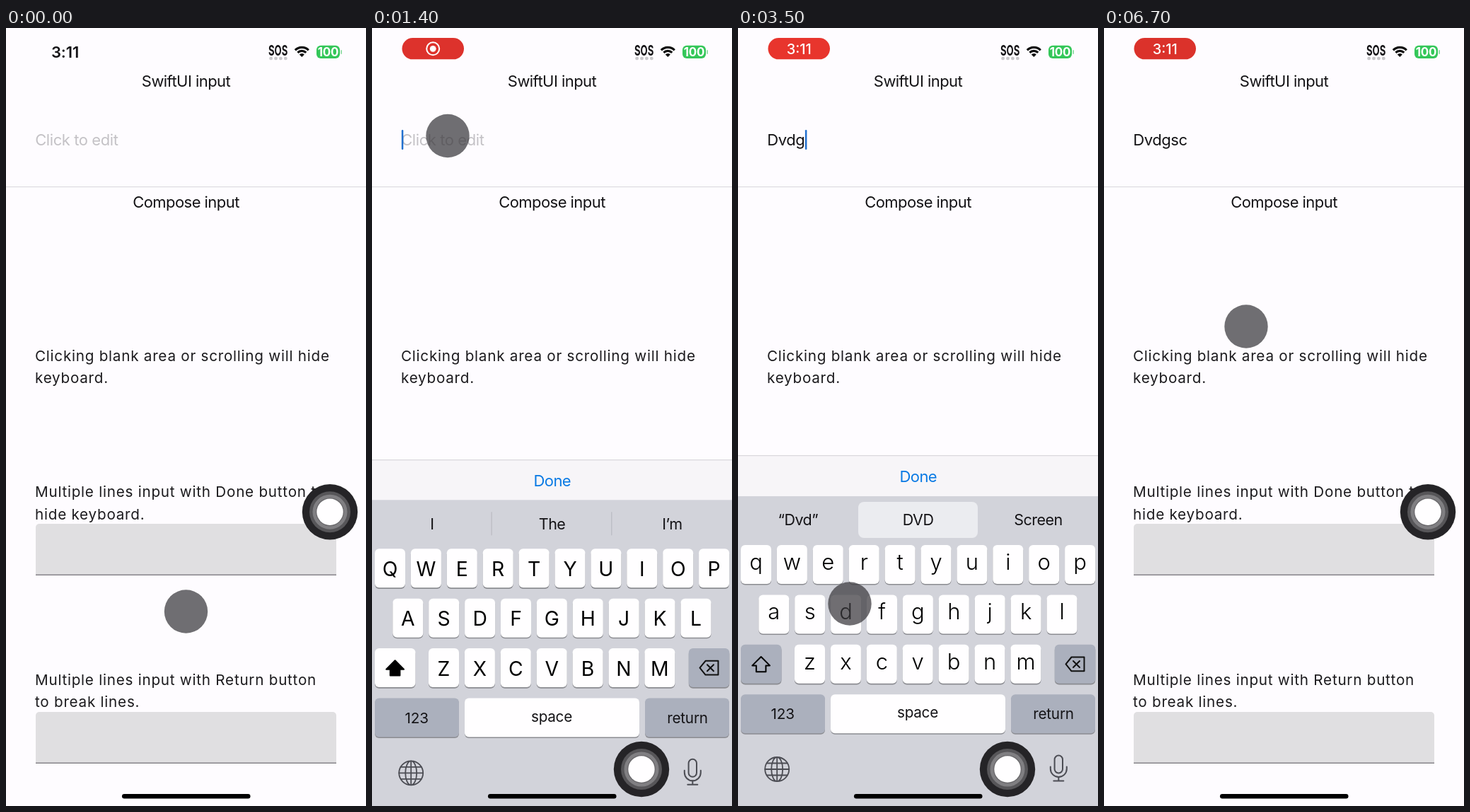
These frames come from a looping animation (509 px wide and 1100 px high, 6800 ms). An HTML page with a canvas:

```html
<!DOCTYPE html>
<html lang="en">
<head>
<meta charset="utf-8">
<title>Keyboard input demo</title>
<style>
  html, body { margin: 0; width: 100%; height: 100%; overflow: hidden; background: #fefcff; }
  canvas { display: block; width: 509px; height: 1100px; }
</style>
</head>
<body>
<canvas id="stage"></canvas>
<script>
const W = 509, H = 1100, LOOP = 6800, STEP = 100;
const canvas = document.getElementById('stage');
const ctx = canvas.getContext('2d');
const ratio = window.devicePixelRatio || 1;
canvas.width = W * ratio;
canvas.height = H * ratio;

const INK = '#141316', BLUE = '#0a7ae4', KEY_GRAY = '#abb0bd', ICON = '#4c4d54';
const KB_TOP = 662, BAR_TOP = 604, HIDE = H - BAR_TOP, PITCH = 50.9;

// [time, value] lists: the last entry already reached wins
const TYPED = [[0, ''], [2600, 'D'], [2900, 'Dv'], [3200, 'Dvd'], [3500, 'Dvdg'], [3800, 'Dvdgs'], [4100, 'Dvdgsc']];
const TOUCH = [
  [0, [254.5, 825]], [1000, [107, 152.5]], [2500, [153, 828]], [2800, [254, 898]],
  [3100, [158, 814]], [3700, [102, 828]], [4000, [204, 898]], [4400, [216, 828]],
  [4900, [256, 636]], [6500, [201, 422]]
];

const at = (list, t) => list.filter(e => e[0] <= t).pop()[1];
const clamp = v => Math.min(1, Math.max(0, v));
const mix = (a, b, k) => a + (b - a) * k;
const easeInOut = p => p < .5 ? 2 * p * p : 1 - 2 * (1 - p) ** 2;

// critically damped spring from 0 to 1
function spring(ms) {
  const x = Math.max(0, ms) * .018;
  return 1 - (1 + x) * Math.exp(-x);
}

function text(str, x, y, size, o = {}) {
  ctx.font = `${o.weight || 400} ${size}px Inter, "Liberation Sans", sans-serif`;
  ctx.letterSpacing = (o.track ?? -.55) + 'px';
  ctx.textAlign = o.align || 'center';
  ctx.fillStyle = o.color || INK;
  ctx.fillText(str, x, y);
}

function box(x, y, w, h, r, color) {
  ctx.fillStyle = color;
  ctx.beginPath();
  ctx.roundRect(x, y, w, h, r);
  ctx.fill();
}

function disc(x, y, r, color) {
  ctx.fillStyle = color;
  ctx.beginPath();
  ctx.arc(x, y, r, 0, 7);
  ctx.fill();
}

function pen(color, width) {
  ctx.strokeStyle = color;
  ctx.lineWidth = width;
  ctx.lineCap = ctx.lineJoin = 'round';
}

function lines(...paths) {
  ctx.beginPath();
  for (const p of paths) {
    p.forEach(([x, y], i) => i ? ctx.lineTo(x, y) : ctx.moveTo(x, y));
  }
}

function wifi() {
  pen('#111', 3.2);
  ctx.lineCap = 'butt';
  const a = -Math.PI / 2, spread = .8;
  for (const r of [13.2, 8.2]) {
    ctx.beginPath();
    ctx.arc(418.3, 40.5, r, a - spread, a + spread);
    ctx.stroke();
  }
  ctx.fillStyle = '#111';
  ctx.beginPath();
  ctx.moveTo(418.3, 41);
  ctx.arc(418.3, 41, 5, a - spread, a + spread);
  ctx.fill();
}

function statusBar(t) {
  const shown = clamp(t / 500);
  if (shown < 1) {
    ctx.globalAlpha = 1 - shown;
    text('3:11', 83.5, 42, 22, { weight: 600, track: -.1 });
  }
  ctx.globalAlpha = shown;
  const glow = .5 - .5 * Math.cos((t - 1175) / 1900 * 2 * Math.PI);
  const red = `rgb(${mix(216, 255, glow)},${mix(49, 59, glow)},${mix(43, 48, glow)})`;
  box(42.5, 14, 87.5, 30.3, 15.1, red);
  if (t < 3000) {
    pen('#fff', 2);
    ctx.beginPath();
    ctx.arc(86.2, 29.3, 9, 0, 7);
    ctx.stroke();
    disc(86.2, 29.3, 4.4, '#fff');
  } else {
    text('3:11', 86.3, 36.5, 20, { color: '#fff', weight: 500, track: 0 });
  }
  ctx.globalAlpha = 1;

  ctx.save();
  ctx.translate(384.6, 39);
  ctx.scale(.64, 1);
  text('SOS', 0, 0, 20.5, { weight: 700, track: 0 });
  ctx.restore();
  for (let i = 0; i < 4; i++) box(372.3 + i * 6.9, 40.8, 4.6, 4.4, 1.8, '#c9c8cb');
  wifi();
  box(439, 24.7, 33, 18.4, 6, '#34c759');
  box(473.2, 31, 1.8, 6, 1, '#8fdda4');
  text('100', 455.4, 40.2, 17, { color: '#fff', weight: 700, track: -.3 });
}

function field(y) {
  box(42, y, 425, 72, [5, 5, 0, 0], '#e0dfe1');
  ctx.fillStyle = '#77747a';
  ctx.fillRect(42, y + 71.6, 425, 1.3);
}

function page(typed, focused) {
  text('SwiftUI input', 254.5, 83, 22);
  const entry = { align: 'left', track: -.42, color: typed ? INK : '#c4c2c6' };
  text(typed || 'Click to edit', 41.2, 166, 22, entry);
  if (focused) {
    const w = typed ? ctx.measureText(typed).width : 0;
    box(41.8 + w, 144, 2.5, 28, 1.2, '#2170cf');
  }
  ctx.fillStyle = '#dddce0';
  ctx.fillRect(0, 224, W, 1.2);
  text('Compose input', 254.5, 254, 22);

  const body = { align: 'left', track: .74, color: '#1c1b1e' };
  const para = (a, b, y) => {
    text(a, 41, y, 20.7, body);
    text(b, 41, y + 31.2, 20.7, body);
  };
  para('Clicking blank area or scrolling will hide', 'keyboard.', 470.5);
  para('Multiple lines input with Done button to', 'hide keyboard.', 663.3);
  para('Multiple lines input with Return button', 'to break lines.', 929);
  field(701);
  field(967);
}

function key(x, y, w, color = '#fffeff') {
  box(x, y + 1.6, w, 55, 6, '#8b8c91');
  box(x, y, w, 55, 6, color);
}

function suggestions(typed) {
  let words = ['I', 'The', 'I’m'];
  const match = typed === 'Dvd';
  if (match) words = ['“Dvd”', 'DVD', 'Screen'];
  else if (typed) words = ['“' + typed + '”'];
  if (match) {
    box(170, 670, 169, 51, 8, '#ebecf0');
  } else {
    ctx.fillStyle = '#b9bac1';
    ctx.fillRect(168.5, 679, 1.2, 33);
    ctx.fillRect(338.2, 679, 1.2, 33);
  }
  words.forEach((s, i) => text(s, 84.8 + i * 169.8, 703.3, 21.5));
}

function letters(row, x, y, upper) {
  [...row].forEach((c, i) => {
    const kx = x + i * PITCH;
    key(kx, y, 43);
    if (upper) text(c, kx + 21.5, y + 38.7, 28.3, { color: '#000', track: 0 });
    else text(c.toLowerCase(), kx + 21.5, y + 35, 31, { color: '#000', weight: 300, track: 0 });
  });
}

function globe(x, y) {
  pen(ICON, 1.8);
  ctx.beginPath();
  ctx.arc(x, y, 17, 0, 7);
  ctx.moveTo(x + 8, y);
  ctx.ellipse(x, y, 8, 17, 0, 0, 7);
  ctx.stroke();
  lines([[x, y - 17], [x, y + 17]], [[x - 17, y], [x + 17, y]],
    [[x - 14.5, y - 8.5], [x + 14.5, y - 8.5]], [[x - 14.5, y + 8.5], [x + 14.5, y + 8.5]]);
  ctx.stroke();
}

function mic(x, y) {
  pen(ICON, 2);
  ctx.beginPath();
  ctx.roundRect(x - 5.7, y - 19, 11.4, 25, 5.7);
  ctx.stroke();
  ctx.beginPath();
  ctx.moveTo(x - 11.5, y - 3);
  ctx.lineTo(x - 11.5, y);
  ctx.arc(x, y, 11.5, Math.PI, 0, true);
  ctx.lineTo(x + 11.5, y - 3);
  ctx.stroke();
  lines([[x, y + 11.5], [x, y + 17]], [[x - 7, y + 17], [x + 7, y + 17]]);
  ctx.stroke();
}

function keyboard(dy, typed, hint) {
  ctx.save();
  ctx.translate(0, dy);
  ctx.fillStyle = '#d2d3da';
  ctx.fillRect(0, KB_TOP, W, H - KB_TOP);
  suggestions(hint);

  const upper = !typed;
  letters('QWERTYUIOP', 4, 731, upper);
  letters('ASDFGHJKL', 29.3, 801.4, upper);
  letters('ZXCVBNM', 80, 871.8, upper);

  key(4, 871.8, 57.5, upper ? '#fffeff' : KEY_GRAY);
  lines([[32.6, 889], [45, 901.4], [39.4, 901.4], [39.4, 910.3], [25.8, 910.3], [25.8, 901.4], [20.2, 901.4]]);
  ctx.closePath();
  pen('#000', 2);
  ctx.stroke();
  if (upper) {
    ctx.fillStyle = '#000';
    ctx.fill();
  }

  key(447.8, 871.8, 57.5, KEY_GRAY);
  pen('#111', 2);
  lines([[463.5, 899.4], [471.5, 889.5], [489.5, 889.5], [489.5, 909.3], [471.5, 909.3]]);
  ctx.closePath();
  ctx.stroke();
  lines([[474, 895], [483, 904]], [[483, 895], [474, 904]]);
  ctx.stroke();

  key(4, 942.2, 119, KEY_GRAY);
  key(131, 942.2, 247);
  key(386, 942.2, 119, KEY_GRAY);
  text('123', 63.2, 977.3, 20.7, { track: -.2 });
  text('space', 254, 975.3, 20.7, { track: -.3 });
  text('return', 446, 977.3, 20.7, { track: -.2 });
  globe(55.2, 1048);
  mic(453.3, 1047.5);
  ctx.restore();
}

function doneBar(dy) {
  ctx.save();
  ctx.translate(0, dy);
  ctx.fillStyle = '#f7f5f8';
  ctx.fillRect(0, BAR_TOP, W, 70);
  ctx.fillStyle = '#d9d7db';
  ctx.fillRect(0, BAR_TOP, W, 1.2);
  text('Done', 254.8, 642, 22, { color: BLUE });
  ctx.restore();
}

function floatButton(k) {
  const x = mix(458, 381, k), y = mix(684.2, 1048, k);
  disc(x, y, 39.2, '#252427');
  disc(x, y, 29, '#575659');
  disc(x, y, 24.5, '#807f82');
  disc(x, y, 20, '#69686b');
  disc(x, y, 18.7, '#fffeff');
}

function draw(t) {
  ctx.setTransform(ratio, 0, 0, ratio, 0, 0);
  ctx.fillStyle = '#fefcff';
  ctx.fillRect(0, 0, W, H);

  const typed = at(TYPED, t);
  const hint = at(TYPED, Math.max(0, t - 100));
  page(typed, t >= 1100 && t < 5000);
  statusBar(t);

  // the bar trails the keys slightly on the way up
  const drop = start => HIDE * (1 - spring(t - start) + spring(t - 4867));
  const barDy = drop(1045), keysDy = drop(1035.5);
  if (barDy < HIDE - .5) {
    doneBar(barDy);
    keyboard(keysDy, typed, hint);
  }

  const [x, y] = at(TOUCH, t);
  disc(x, y, 30.7, 'rgba(60,58,62,.73)');
  floatButton(easeInOut(clamp((t - 1014) / 250)) - easeInOut(clamp((t - 4850) / 250)));
  box(164, 1083, 181.5, 6.4, 3.2, '#000');
}

function frame(now) {
  draw(Math.floor(now % LOOP / STEP) * STEP);
  requestAnimationFrame(frame);
}
requestAnimationFrame(frame);
</script>
</body>
</html>
```
